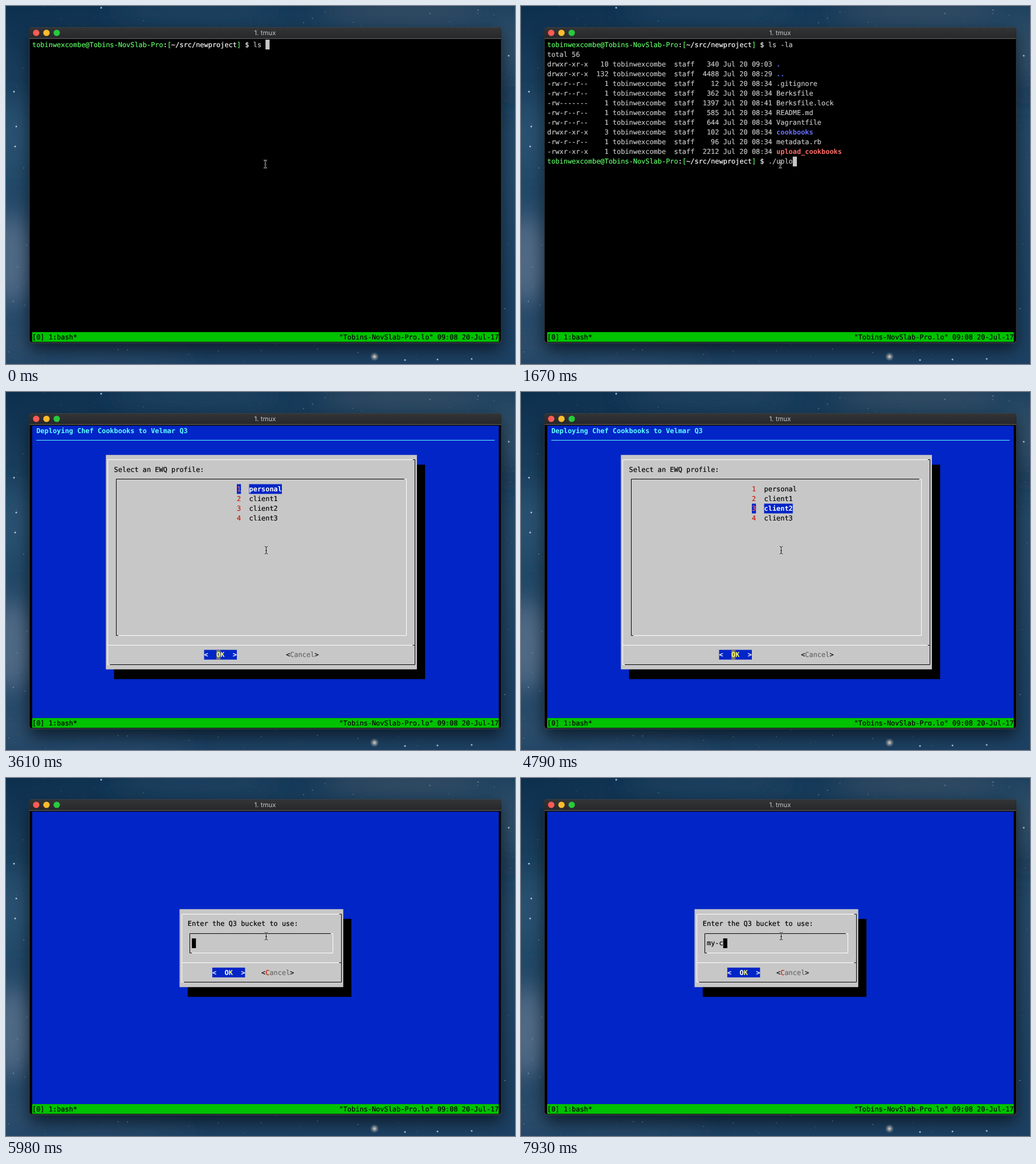
Recreate the animation shown at these times as an HTML page. Size 893x627 px, loop 8 s.

```html
<!DOCTYPE html>
<html lang="en">
<head>
<meta charset="utf-8">
<title>Terminal</title>
<style>
  html, body { margin: 0; width: 100%; height: 100%; overflow: hidden; background: #1f4163; }
  svg { display: block; width: 893px; height: 627px; }
  text { white-space: pre; text-rendering: geometricPrecision; }
  .mono { font-family: "DejaVu Sans Mono", monospace; font-size: 11.93px; }
  .mono text { stroke-width: 0.2px; }
  .title { font: 11.5px Inter, sans-serif; }
</style>
</head>
<body>
<svg viewBox="0 0 893 627" xmlns="http://www.w3.org/2000/svg">
  <defs>
    <linearGradient id="sky" x2="0.25" y2="1">
      <stop offset="0" stop-color="#0d2f4e"/>
      <stop offset="0.35" stop-color="#234a68"/>
      <stop offset="0.7" stop-color="#244868"/>
      <stop offset="1" stop-color="#1d4163"/>
    </linearGradient>
    <linearGradient id="bar" x2="0" y2="1">
      <stop offset="0" stop-color="#333436"/>
      <stop offset="1" stop-color="#262729"/>
    </linearGradient>
    <radialGradient id="glow">
      <stop offset="0" stop-color="#fffaf0"/>
      <stop offset="0.25" stop-color="#e2d5c6" stop-opacity="0.8"/>
      <stop offset="1" stop-color="#8fa5bb" stop-opacity="0"/>
    </radialGradient>
    <filter id="haze" x="-60%" y="-60%" width="220%" height="220%"><feGaussianBlur stdDeviation="20"/></filter>
    <filter id="shade" x="-10%" y="-10%" width="120%" height="125%"><feGaussianBlur stdDeviation="14"/></filter>
    <path id="beam" d="M-2.8-6.8Q0-6.6 0-3.8V3.8Q0 6.6-2.8 6.8M2.8-6.8Q0-6.6 0-3.8M0 3.8Q0 6.6 2.8 6.8M-1.5 .8H1.5"/>
  </defs>

  <rect width="893" height="627" fill="url(#sky)"/>
  <g filter="url(#haze)">
    <ellipse cx="10" cy="445" rx="42" ry="80" fill="#5f7690" opacity="0.75"/>
    <ellipse cx="15" cy="225" rx="40" ry="60" fill="#2c5877" opacity="0.6"/>
    <ellipse cx="10" cy="590" rx="50" ry="40" fill="#34536f" opacity="0.6"/>
    <ellipse cx="700" cy="8" rx="150" ry="22" fill="#4a5868" opacity="0.6"/>
    <ellipse cx="330" cy="6" rx="150" ry="20" fill="#2d4e6c" opacity="0.5"/>
    <ellipse cx="885" cy="70" rx="30" ry="60" fill="#3c5268" opacity="0.5"/>
    <ellipse cx="885" cy="150" rx="22" ry="25" fill="#122e4c" opacity="0.6"/>
    <ellipse cx="180" cy="622" rx="150" ry="20" fill="#315274" opacity="0.5"/>
  </g>
  <g id="stars" fill="#c5d9e8"></g>
  <circle cx="646.5" cy="614" r="8" fill="url(#glow)"/>

  <rect x="41" y="50" width="828" height="553" rx="6" opacity="0.55" filter="url(#shade)"/>
  <rect x="40.5" y="37" width="829" height="553.5" rx="5" fill="#3b3f44"/>
  <rect x="41.5" y="38" width="827" height="551" rx="4.5"/>
  <path d="M41.5 57V42.5Q41.5 38 46 38H864Q868.5 38 868.5 42.5V57Z" fill="url(#bar)"/>
  <rect x="41.5" y="56.5" width="827" height="1" fill="#777"/>
  <circle cx="53" cy="47" r="5.6" fill="#ff5b55"/>
  <circle cx="71" cy="47" r="5.6" fill="#fdbc2d"/>
  <circle cx="89" cy="47" r="5.6" fill="#28c93f"/>
  <text class="title" x="454.5" y="51" text-anchor="middle" fill="#c4c4c4">1. tmux</text>

  <g id="screen" class="mono"></g>
  <g id="status" class="mono"></g>
  <g id="pointer" fill="none">
    <use href="#beam" stroke="#e4e4e4" stroke-width="1.9"/>
    <use href="#beam" stroke="#111" stroke-width="1"/>
  </g>
</svg>
<script>
const LOOP = 8000, LEFT = 46, TOP = 59, CELL = 7.18, LINE = 17.07, COLS = 114;
const FG = '#c7c7c7', GREEN = '#5ff967', WHITE = '#fff', BLACK = '#000', BLUE = '#0225c7',
      RED = '#c91b00', PINK = '#ff6d67', INDIGO = '#6871ff', CYAN = '#60fdff',
      YELLOW = '#fffc67', GREY = '#686868';
const USER = 'tobinwexcombe', HOST = 'Tobins-NovSlab-Pro';

const $ = id => document.getElementById(id);
const colX = col => LEFT + col * CELL;
const rowY = row => TOP + row * LINE;
const escapeText = s => s.replace(/&/g, '&amp;').replace(/</g, '&lt;');

const text = (col, row, s, fill = FG, bold = false) =>
  `<text x="${colX(col)}" y="${rowY(row) + 12.5}" fill="${fill}" ` +
  `${bold ? 'font-weight="700"' : `stroke="${fill}"`}>${escapeText(s)}</text>`;

const block = (col, row, cols, rows, fill) =>
  `<rect x="${colX(col)}" y="${rowY(row)}" width="${cols * CELL}" height="${rows * LINE}" fill="${fill}"/>`;

const line = (d, stroke) => `<path d="${d}" fill="none" stroke="${stroke}"/>`;

// Places differently coloured runs one after another.
function runs(col, row, ...parts) {
  return parts.map(([s, fill, bold]) => {
    const out = text(col, row, s, fill, bold);
    col += s.length;
    return out;
  }).join('');
}

const snap = v => Math.floor(v) + 0.5;

// Bevelled frame running through the centres of its edge cells.
function frame(col, row, cols, rows, near, far) {
  const x0 = snap(colX(col + 0.5)), x1 = snap(colX(col + cols - 0.5)),
        y0 = snap(rowY(row + 0.5)), y1 = snap(rowY(row + rows - 0.5)), half = CELL / 2;
  return line(`M${x0 + half} ${y1}H${x0}V${y0}H${x1 - half}`, near) +
         line(`M${x1 - half} ${y0}H${x1}V${y1}H${x0 + half}`, far);
}

function dialogBox(col, row, cols, rows) {
  const y = snap(rowY(row + rows - 2.5)), right = colX(col + cols - 1);
  return block(col + 2, row + 1, cols, rows, BLACK) +
    block(col, row, cols, rows, FG) +
    frame(col, row, cols, rows, WHITE, BLACK) +
    line(`M${snap(colX(col + 0.5))} ${y}H${right}`, WHITE) +
    line(`M${right} ${y}h${CELL / 2}`, BLACK);
}

const okButton = (col, row, first, cursor) =>
  block(col, row, 8, 1, BLUE) +
  (cursor ? block(col + 3, row, 1, 1, '#777') : '') +
  runs(col, row, ['<  ', WHITE, true], ['O', first, true], ['K', YELLOW, true], ['  >', WHITE, true]);

const cancelButton = (col, row, first) =>
  runs(col, row, ['<', BLACK], ['C', first], ['ancel', GREY], ['>', BLACK]);

function prompt(row, command, cursor = true) {
  return runs(0, row, [USER + '@' + HOST, GREEN], [':', WHITE], ['[', GREEN],
      ['~/src/newproject', WHITE], [']', GREEN], [' $ ', WHITE], [command, FG]) +
    (cursor ? block(54 + command.length, row, 1, 1, FG) : '');
}

const FILES = [
  ['drwxr-xr-x', 10, 340, '09:03', '.', INDIGO],
  ['drwxr-xr-x', 132, 4488, '08:29', '..', INDIGO],
  ['-rw-r--r--', 1, 12, '08:34', '.gitignore'],
  ['-rw-r--r--', 1, 362, '08:34', 'Berksfile'],
  ['-rw-------', 1, 1397, '08:41', 'Berksfile.lock'],
  ['-rw-r--r--', 1, 585, '08:34', 'README.md'],
  ['-rw-r--r--', 1, 644, '08:34', 'Vagrantfile'],
  ['drwxr-xr-x', 3, 102, '08:34', 'cookbooks', INDIGO],
  ['-rw-r--r--', 1, 96, '08:34', 'metadata.rb'],
  ['-rwxr-xr-x', 1, 2212, '08:34', 'upload_cookbooks', PINK],
];

function listing() {
  return text(0, 1, 'total 56') + FILES.map(([mode, links, size, time, name, color], i) => {
    const info = `${mode}  ${String(links).padStart(3)} ${USER}  staff  ${String(size).padStart(4)} Jul 20 ${time} `;
    return runs(0, i + 2, [info, FG], [name, color || FG, !!color]);
  }).join('');
}

const shellStart = command => prompt(0, command);
const shell = command => prompt(0, 'ls -la', false) + listing() + prompt(12, command);
const running = () => prompt(0, 'ls -la', false) + listing() +
  prompt(12, './upload_cookbooks', false) + block(0, 13, 1, 1, FG);

const backdrop = () => block(0, 0, COLS, 30, BLUE);

function profileMenu(selected, cursor) {
  const items = ['personal', 'client1', 'client2', 'client3'].map((name, i) => {
    const row = 6 + i, on = i === selected;
    return (on ? block(50, row, 1, 1, BLUE) + block(53, row, name.length, 1, BLUE) : '') +
      text(50, row, String(i + 1), on ? PINK : RED) + text(53, row, name, on ? WHITE : BLACK, on);
  }).join('');
  return backdrop() +
    text(1, 0, 'Deploying Chef Cookbooks to Velmar Q3', CYAN, true) +
    line(`M${colX(1)} ${snap(rowY(1.5))}H${colX(COLS - 1)}`, CYAN) +
    dialogBox(18, 3, 76, 22) +
    text(20, 4, 'Select an EWQ profile:', BLACK) +
    frame(20, 5, 72, 17, BLACK, WHITE) + items +
    okButton(42, 23, YELLOW, cursor) + cancelButton(62, 23, GREY);
}

function bucketInput(value, cursor = true) {
  return backdrop() + dialogBox(36, 10, 40, 8) +
    text(38, 11, 'Enter the Q3 bucket to use:', BLACK) +
    frame(38, 12, 36, 3, BLACK, WHITE) +
    text(39, 13, value, BLACK) +
    (cursor ? block(39 + value.length, 13, 1, 1, BLACK) : '') +
    okButton(44, 16, WHITE, false) + cancelButton(56, 16, RED);
}

const TIMELINE = [
  [0, shellStart, 'ls '],
  [150, shellStart, 'ls -la'],
  [320, shell, ''],
  [920, shell, '.'],
  [1070, shell, './'],
  [1370, shell, './u'],
  [1520, shell, './upl'],
  [1670, shell, './uplo'],
  [1820, shell, './uploa'],
  [1970, shell, './upload_cookbooks '],
  [3460, running],
  [3610, profileMenu, 0, true],
  [4500, profileMenu, 1, true],
  [4650, profileMenu, 2, true],
  [4800, profileMenu, 3, true],
  [5090, profileMenu, 2, true],
  [5240, profileMenu, 1, true],
  [5390, profileMenu, 0, true],
  [5540, profileMenu, 0, false],
  [5980, bucketInput, ''],
  [6580, bucketInput, '', false],
  [7180, bucketInput, ''],
  [7480, bucketInput, 'my'],
  [7780, bucketInput, 'my-'],
  [7930, bucketInput, 'my-c'],
];

function drawStars() {
  let seed = 7;
  const random = () => (seed = seed * 16807 % 2147483647) / 2147483647;
  const star = (x, y, r, o) => `<circle cx="${x}" cy="${y}" r="${r}" opacity="${o}"/>`;
  let out = '';
  for (let i = 0; i < 600; i++) {
    out += star(random() * 893, random() * 627, 0.4 + random() ** 4 * 0.8, 0.2 + random() * 0.5);
  }
  for (const [x, y] of [[16, 246], [18, 211], [167, 3], [14, 150], [700, 620], [757, 619], [817, 618], [882, 87]]) {
    out += star(x, y, 1.5, 0.9);
  }
  $('stars').innerHTML = out;
}

function drawStatus() {
  const right = `"${HOST}.lo" 09:08 20-Jul-17`;
  $('status').innerHTML = block(0, 30, COLS, 1, '#00c200') +
    text(0, 30, '[0] 1:bash*', BLACK) + text(COLS - right.length, 30, right, BLACK);
}

let shown = null;
function update(time) {
  const step = TIMELINE.findLast(([start]) => start <= time);
  if (step === shown) return;
  shown = step;
  const [start, scene, ...args] = step;
  $('screen').innerHTML = scene(...args);
  $('pointer').setAttribute('transform', `translate(${start < 3610 ? 455 : 456.5} 277)`);
}

drawStars();
drawStatus();
update(0);
const origin = performance.now();
(function tick() {
  update((performance.now() - origin) % LOOP);
  requestAnimationFrame(tick);
})();
</script>
</body>
</html>
```
